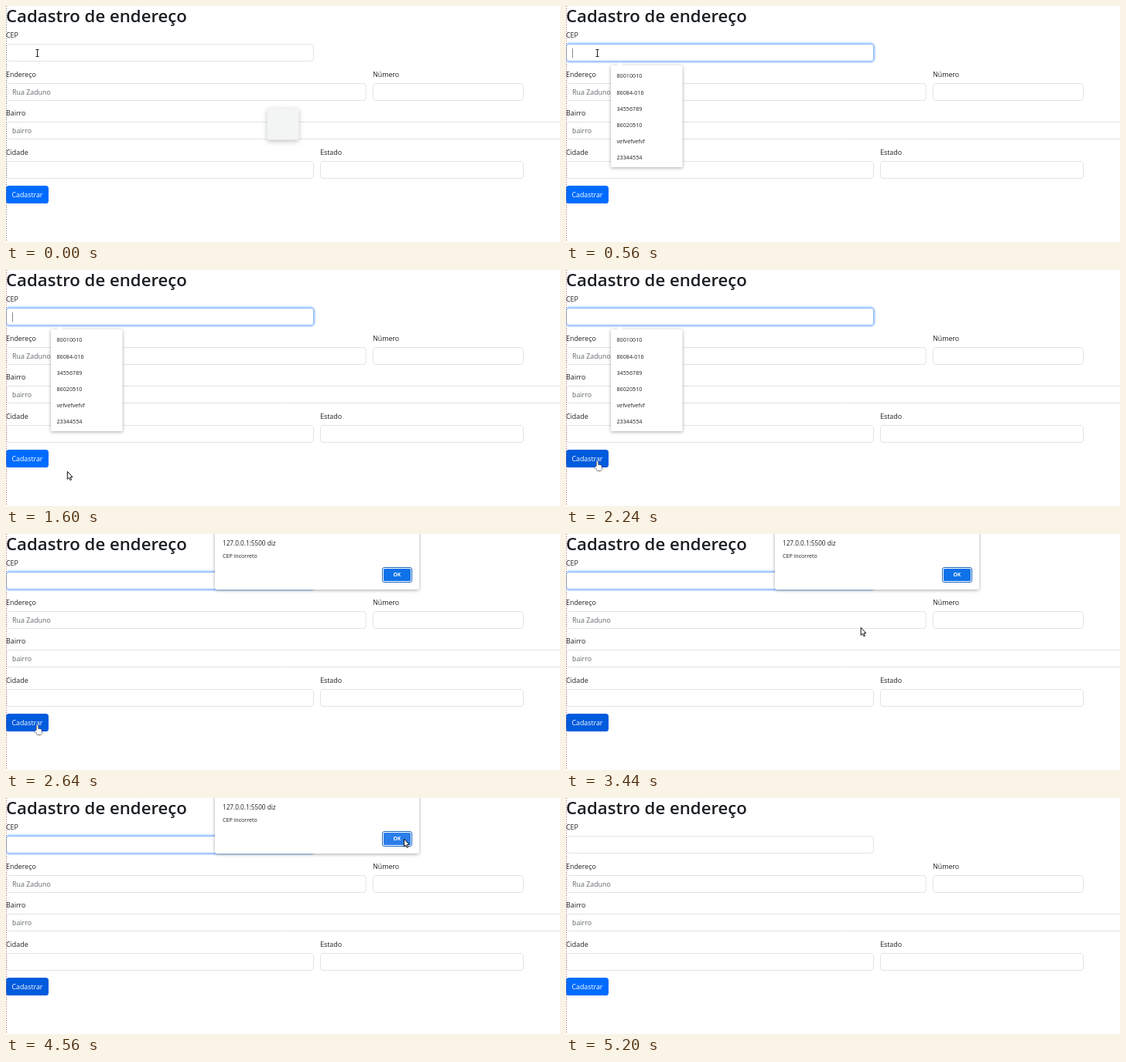
Recreate the animation shown at these times as an HTML page with a canvas. Size 716 by 306 pixels, loop 5280 ms.

```html
<!DOCTYPE html>
<html lang="pt-BR">
<head>
<meta charset="utf-8">
<title>Cadastro de endereço</title>
<style>
html, body { margin: 0; width: 100%; height: 100%; overflow: hidden; background: #fff; }
canvas { display: block; }
</style>
</head>
<body>
<canvas id="stage" width="716" height="306"></canvas>
<script>
const ctx = document.getElementById('stage').getContext('2d');
const LOOP = 5280;
const FOCUS = 320, ALERT = 2480, RESET = 4800;
const FONT = '"Open Sans", "Noto Sans", sans-serif';
const INK = '#1c2024', MUTED = '#62686e', BORDER = '#e1e4e8';
const FIELD_H = 22;
const ITEMS = ['80010010', '86084-016', '34556789', '86020510', 'vefvefvefvf', '23344554'];
const LIST = { x: 58, y: 77, w: 92.5, h: 132, top: 79.5, row: 21.2 };
const BUTTON = { x: 0, y: 233, w: 55, h: 23 };
const OK = { x: 488, y: 45, w: 35, h: 16 };

const field = (row, label, x, right, hint = '') =>
  ({ label, hint, x, y: Math.round(49 + 50.6 * row) + .5, w: right - x, h: FIELD_H });
const FIELDS = [
  field(0, 'CEP', .5, 397.5),
  field(1, 'Endereço', .5, 465, 'Rua Zaduno'),
  field(1, 'Número', 474.5, 668.5),
  field(2, 'Bairro', .5, 730, 'bairro'),
  field(3, 'Cidade', .5, 397.5),
  field(3, 'Estado', 406.5, 668.5)
];

// the pointer eases from stop to stop and rests at each one
const STOPS = [
  { x: 40, y: 61 },
  { from: 640, to: 1100, x: 128, y: 187 },
  { from: 1200, to: 1680, x: 75, y: 267 },
  { from: 1760, to: 2160, x: 40, y: 248 },
  { from: 2880, to: 3780, x: 540, y: 62 },
  { from: 3800, to: 4080, x: 514, y: 53 }
];

function pointer(t) {
  let { x, y } = STOPS[0];
  for (const s of STOPS.slice(1)) {
    const u = Math.min(1, Math.max(0, (t - s.from) / (s.to - s.from)));
    const k = u * u * (3 - 2 * u);
    x += (s.x - x) * k;
    y += (s.y - y) * k;
  }
  return { x, y };
}

const inside = (p, r) => p.x >= r.x && p.x <= r.x + r.w && p.y >= r.y && p.y <= r.y + r.h;

function text(str, x, y, size, color = INK, weight = 400) {
  ctx.font = `${weight} ${size}px ${FONT}`;
  ctx.fillStyle = color;
  ctx.fillText(str, x, y);
}

function box(x, y, w, h, r, fill, stroke, line = 1) {
  ctx.beginPath();
  ctx.roundRect(x, y, w, h, r);
  if (fill) { ctx.fillStyle = fill; ctx.fill(); }
  if (stroke) { ctx.strokeStyle = stroke; ctx.lineWidth = line; ctx.stroke(); }
}

function shadowBox(x, y, w, h, r, fill, blur, dy, alpha) {
  ctx.save();
  ctx.shadowColor = `rgba(0,0,0,${alpha})`;
  ctx.shadowBlur = blur;
  ctx.shadowOffsetY = dy;
  box(x, y, w, h, r, fill);
  ctx.restore();
}

function form(focused, preview, hover) {
  text('Cadastro de endereço', 0, 21, 22.2, INK, 600);
  for (const { label, hint, x, y, w, h } of FIELDS) {
    const active = focused && label === 'CEP';
    text(label, x - .5, y - 8.5, 8.9);
    if (active) box(x - 1.5, y - 1.5, w + 3, h + 3, 5, null, '#c2dbfe', 2);
    box(x, y, w, h, 3.5, active && preview ? '#e8f0fe' : '#fff', active ? '#86b7fe' : BORDER);
    text(active ? preview : hint, 8, y + 14.5, active ? 7.5 : 8.9, active ? INK : MUTED);
  }
  const { x, y, w, h } = BUTTON;
  box(x, y, w, h, 3.6, hover ? '#005bdd' : '#006cff');
  text('Cadastrar', 7.5, 248, 8.8, '#fff');
}

function suggestions(row) {
  const { x, y, w, h } = LIST;
  shadowBox(x, y, w, h, 1.5, '#fff', 4, 1, .35);
  ctx.beginPath();
  ctx.moveTo(x + 8, y + .5);
  ctx.lineTo(x + 12, y - 4);
  ctx.lineTo(x + 16, y + .5);
  ctx.fillStyle = '#fff';
  ctx.fill();
  ITEMS.forEach((item, i) => {
    const top = LIST.top + i * LIST.row;
    if (i === row) box(x, top, w, LIST.row, 0, '#e8e8e8');
    text(item, 65.5, top + 13.8, 7.2);
  });
}

function alertBox(hover) {
  shadowBox(270, -10, 264, 82, 3, '#fff', 4, 1, .35);
  text('127.0.0.1:5500 diz', 280, 14.5, 8.2);
  text('CEP incorreto', 280, 31, 7.1);
  const { x, y, w, h } = OK;
  box(x - 1.5, y - 1.5, w + 3, h + 3, 2.5, '#fff', '#1a66c0');
  box(x, y, w, h, 1.5, hover ? '#2b7de9' : '#1072e8');
  text('OK', 500.5, 55.3, 6.6, '#fff', 700);
}

const CURSORS = {
  beam() {
    ctx.fillStyle = '#222';
    ctx.fillRect(-.5, -4.5, 1, 9);
    for (const y of [-5, 4]) ctx.fillRect(-2, y, 4, 1);
  },
  arrow() {
    ctx.beginPath();
    for (const [x, y] of [[0, 0], [0, 10], [2.2, 8], [3.8, 11.4], [5.3, 10.7], [3.8, 7.4], [6.6, 7.2]]) ctx.lineTo(x, y);
    ctx.closePath();
    ctx.fillStyle = '#fff';
    ctx.strokeStyle = '#111';
    ctx.lineWidth = 1;
    ctx.fill();
    ctx.stroke();
  },
  hand() {
    // stroke all parts first so their fills merge into one shape
    for (const stroke of ['#111', null]) {
      box(-1, 0, 2, 9, 1, '#fff', stroke);
      box(-1, 4.8, 6.5, 7.5, 2, '#fff', stroke);
      box(-3.5, 7, 4, 2.5, 1.2, '#fff', stroke);
    }
  }
};

function draw(t) {
  const p = pointer(t);
  const modal = t >= ALERT && t < RESET;
  const focused = t >= FOCUS && t < RESET;
  const open = focused && !modal;
  const overList = open && inside(p, { ...LIST, y: LIST.top, h: ITEMS.length * LIST.row - 1 });
  const row = overList ? Math.floor((p.y - LIST.top) / LIST.row) : -1;
  const overButton = inside(p, BUTTON);
  const preview = overList ? ITEMS[row] : '';

  ctx.fillStyle = '#fff';
  ctx.fillRect(0, 0, 716, 306);
  form(focused, preview, modal || overButton);

  if (open && !preview && (t - FOCUS) % 1060 < 530) {
    ctx.fillStyle = '#888';
    ctx.fillRect(8, 55, 1, 12);
  }

  // dotted page edge
  ctx.fillStyle = t < 80 ? '#777' : '#b06a6a';
  for (let y = 0; y < 306; y += 3) ctx.fillRect(0, y, 1, 1);

  if (open) suggestions(row);
  if (modal) alertBox(inside(p, OK));

  if (t < 320) {
    ctx.globalAlpha = Math.min(1, (320 - t) / 240);
    shadowBox(337.5, 132.5, 41, 41, 3, '#f3f5f5', 6, 2, .25);
    ctx.globalAlpha = 1;
  }

  if (t < RESET) {
    const overField = !modal && !overList && FIELDS.some(f => inside(p, f));
    const kind = overButton ? 'hand' : overField ? 'beam' : 'arrow';
    ctx.save();
    ctx.translate(p.x + .5, p.y);
    CURSORS[kind]();
    ctx.restore();
  }
}

const start = performance.now();
function tick() {
  draw((performance.now() - start) % LOOP);
  requestAnimationFrame(tick);
}
tick();
</script>
</body>
</html>
```
